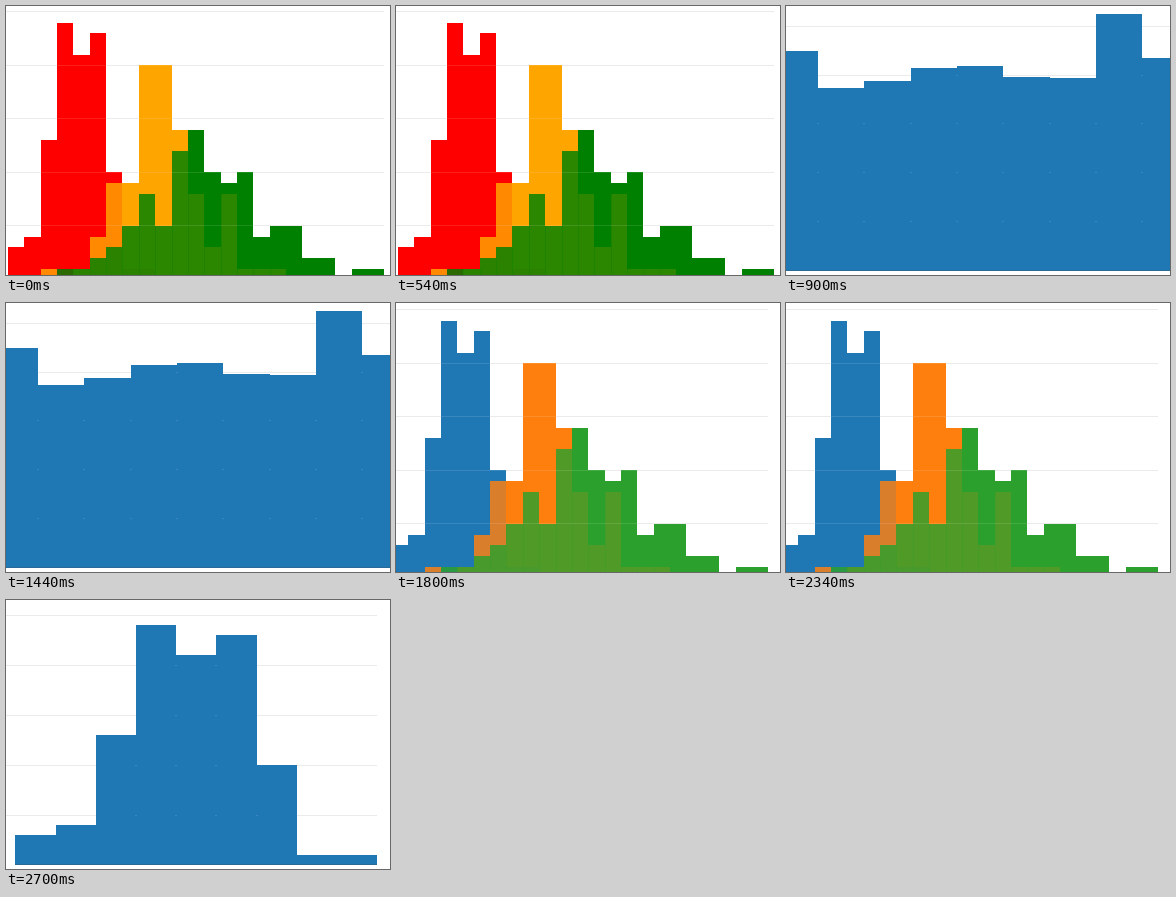
These frames come from a looping animation (384 by 269 pixels, 3600 ms). A matplotlib script:

```python
import math

import matplotlib.pyplot as plt
import numpy as np
from matplotlib.animation import ArtistAnimation
from matplotlib.colors import to_rgb
from matplotlib.patches import Rectangle

W, H, DPI = 384, 269, 64
HOLD = 900
OPACITY = 0.83
GRID = "#ebebeb"
BLUE = "#1f77b4"
AXIS = "#2a6a98"

# Counts per bin, each series starting at its own first bin.
FIRST = (0, [3, 4, 13, 24, 21, 23, 10, 1, 1])
SECOND = (2, [1, 0, 1, 4, 9, 9, 20, 20, 14, 8, 3, 8, 1, 1, 1])
THIRD = (3, [1, 1, 2, 3, 5, 8, 5, 12, 14, 10, 9, 10, 4, 5, 5, 2, 2, 0, 1, 1])
BINS = 23

# Bar heights in pixels.
EVEN = [220, 183, 190, 203, 205, 194, 193, 257, 213]

fig = plt.figure(figsize=(W / DPI, H / DPI), dpi=DPI, facecolor="white")
ax = fig.add_axes([0, 0, 1, 1])
ax.set_xlim(0, W)
ax.set_ylim(H, 0)
ax.axis("off")


def box(x0, y0, x1, y1, color, alpha=1.0):
    return ax.add_patch(Rectangle((x0, y0), x1 - x0, y1 - y0, facecolor=color,
                                  alpha=alpha, linewidth=0, antialiased=False))


def grid_rows(base, step):
    return [math.floor(base - k * step) for k in range(1, 6)]


def blend(colors):
    """Lay translucent colours over an opaque first one."""
    mix = np.array(to_rgb(colors[0]))
    for color in colors[1:]:
        mix = OPACITY * np.array(to_rgb(color)) + (1 - OPACITY) * mix
    return tuple(mix)


def overlaid(left, base, right, colors):
    """Three histograms on shared bins, drawn over each other."""
    unit, width = 10.7, 16.37
    rows = grid_rows(base, 5 * unit)
    art = [box(0, y, right, y + 1, GRID) for y in rows]

    counts = np.zeros((3, BINS), int)
    for row, (start, values) in zip(counts, (FIRST, SECOND, THIRD)):
        row[start:start + len(values)] = values

    def top(n):
        return math.ceil(base - n * unit - 1e-6)

    edges = [round(left + i * width) for i in range(BINS + 1)]
    for i in range(BINS):
        x0, x1 = edges[i], edges[i + 1]
        low = 0
        for high in sorted(set(counts[:, i]) - {0}):
            stack = [c for c, n in zip(colors, counts[:, i]) if n >= high]
            art.append(box(x0, top(high), x1, top(low), blend(stack)))
            if len(stack) > 1 and i:
                # Neighbouring bars share a faint seam.
                seam = min(high, counts[2, i - 1], counts[2, i])
                if seam > low:
                    art.append(box(x0, top(seam), x0 + 1, top(low),
                                   stack[-1], 0.3))
            low = high
        tallest = top(counts[:, i].max())
        art += [box(x0, y, x1, y + 1, "white", 0.12)
                for y in rows if y >= tallest]
    return art


def single(left, width, heights, grid_base, grid_step, right):
    """One blue histogram standing on a thin axis line."""
    base = 265
    rows = grid_rows(grid_base, grid_step)
    art = [box(0, y, right, y + 1, GRID) for y in rows]
    edges = [round(left + i * width) for i in range(len(heights) + 1)]
    for x0, x1, h in zip(edges, edges[1:], heights):
        art.append(box(x0, base - h, x1, base, BLUE))
    art.append(box(edges[0], base - 1, edges[-1], base, AXIS))
    for x, a, b in zip(edges[1:], heights, heights[1:]):
        art += [box(x - 1, y, x + 1, y + 1, "white", 0.12)
                for y in rows if y > base - min(a, b)]
    return art


scenes = [
    overlaid(1.8, 273, 378, ["red", "orange", "green"]),
    single(-14.5, 46.35, EVEN, 264.6, 48.9, W),
    overlaid(-4.2, 274, 372, [BLUE, "#ff7f0e", "#2ca02c"]),
    single(9.3, 40.2, [10 * n for n in FIRST[1]], 265, 50, 371),
]

anim = ArtistAnimation(fig, scenes, interval=HOLD, repeat=True, repeat_delay=0)
plt.show()
```
